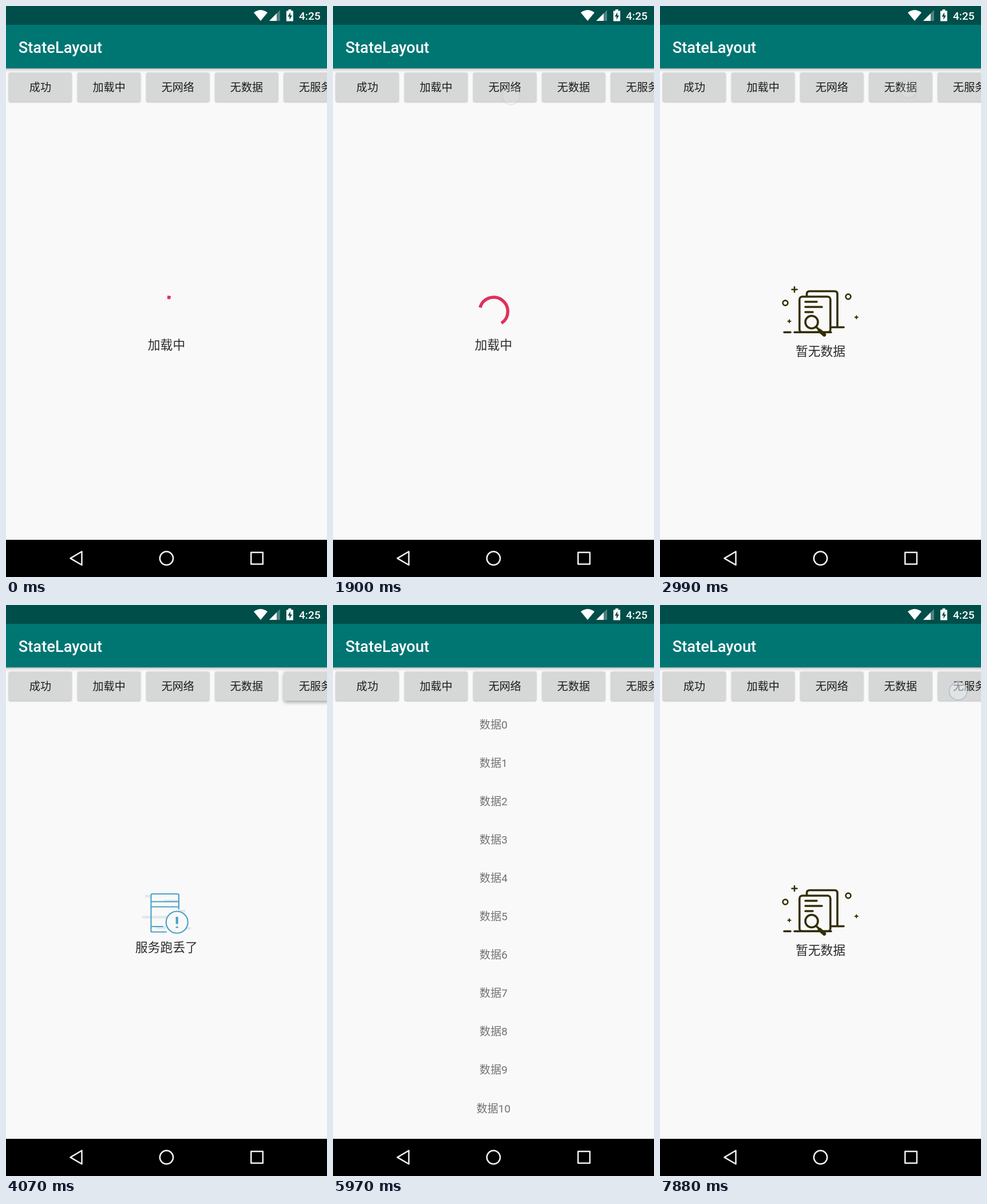
Recreate the animation shown at these times as an HTML page. Size 561x998 px, loop 8000 ms.

```html
<!DOCTYPE html>
<html lang="zh-CN">
<head>
<meta charset="utf-8">
<title>StateLayout</title>
<style>
  html, body { margin: 0; width: 100%; height: 100%; overflow: hidden; background: #f9f9f9; }
  svg { display: block; width: 100%; height: 100%; }
  text { font-family: Roboto, "Noto Sans CJK SC", "Noto Sans CJK", sans-serif; }
  .mid { text-anchor: middle; }
  .label { font-size: 19.1px; fill: #1c1c1c; }
  .item { font-size: 19.1px; fill: #727272; }
  .note { font-size: 21.8px; fill: #2c2c2c; }
  .bar { font-weight: 500; fill: #fff; }
  .button { fill: #d6d7d7; filter: drop-shadow(0 1px 1px rgba(0,0,0,.26)); }
  .button.raised { filter: drop-shadow(0 3px 3px rgba(0,0,0,.34)); }
  .line { fill: none; stroke-linecap: round; stroke-linejoin: round; }
  .state { visibility: hidden; }
  .state.on { visibility: visible; }
</style>
</head>
<body>
<svg viewBox="0 0 561 998" preserveAspectRatio="none">
  <defs>
    <linearGradient id="shade" x2="0" y2="1">
      <stop stop-color="#000" stop-opacity=".27"/>
      <stop offset=".4" stop-color="#000" stop-opacity=".09"/>
      <stop offset="1" stop-color="#000" stop-opacity="0"/>
    </linearGradient>
  </defs>
  <rect width="561" height="998" fill="#f9f9f9"/>

  <g id="buttons"></g>

  <g class="state" id="loading">
    <path id="spinner" fill="none" stroke="#e0305a" stroke-width="5.6"/>
    <text class="note mid" x="280.5" y="600.3">加载中</text>
  </g>

  <g class="state" id="offline">
    <g class="line" stroke="#4aa3c8" stroke-width="3">
      <path d="M236 526Q280 482 324 526M249 540Q280 511 311 540M262 554Q280 538 298 554"/>
      <circle cx="280" cy="568" r="4"/>
      <path d="M246 573L314 499"/>
    </g>
    <text class="note mid" x="280.5" y="611.4">网络走丢了</text>
  </g>

  <g class="state" id="empty">
    <g class="line" stroke="#332e04" stroke-width="3.6">
      <path d="M256.500 507V503.500Q256.500 498.500 261.500 498.500H305Q310 498.500 310 503.500V561M299 561.500H321"/>
      <rect x="243.800" y="508" width="54" height="62.300" rx="5"/>
      <path d="M217 570.300H228M235 570.300H299M254 517H274M254 526H283M254 535H267"/>
      <circle cx="265" cy="552.500" r="11"/>
      <path d="M273.500 561.500L279 567"/>
      <path d="M279 567.500L287 574.500" stroke-width="6.500"/>
      <g stroke-width="2.600">
        <circle cx="219" cy="519" r="4.400"/>
        <circle cx="329" cy="508" r="4.400"/>
        <path d="M230.500 495.500H239.500M235 491V500"/>
        <path d="M223.500 551H228.500M226 548.500V553.500M340.800 544H345.800M343.300 541.500V546.500" stroke-width="2"/>
      </g>
    </g>
    <text class="note mid" x="280.5" y="611.4">暂无数据</text>
  </g>

  <g class="state" id="server">
    <g fill="none" stroke="#dfe8ec" stroke-width="4.600">
      <path d="M243 509H254M276 517.500H302M300 535H313M238 545.500H284M262 564H280M314 565H323"/>
    </g>
    <g class="line" stroke="#4ba3c7" stroke-width="2.200">
      <path d="M302 531V527.500H253.500V518.500H302V527M253.500 518V507Q253.500 505 255.500 505H300Q302 505 302 507V518M253.500 527V570Q253.500 571.500 255 571.500H280M254 562H274"/>
      <circle cx="298.800" cy="554.500" r="19" fill="#f9f9f9"/>
      <path d="M298.800 545V557.500M298.800 562V564.500" stroke-width="4.200" stroke-linecap="butt"/>
    </g>
    <text class="note mid" x="280.5" y="606">服务跑丢了</text>
  </g>

  <g class="state" id="list"></g>

  <rect y="109" width="561" height="7" fill="url(#shade)"/>
  <rect y="32" width="561" height="77" fill="#007673"/>
  <rect width="561" height="33" fill="#004e49"/>
  <text class="bar" x="21.800" y="81.700" font-size="27.3">StateLayout</text>
  <text class="bar" x="512" y="23.700" font-size="19.1">4:25</text>
  <g fill="#fff">
    <path d="M433 11.500Q445 2.500 457 11.500L445 26Z"/>
    <path d="M460 26L479 7V26Z" opacity=".3"/>
    <path d="M460 26L473 13V26Z"/>
    <path d="M490 8.500H493.500V6H498.500V8.500H502V26.500H490Z"/>
  </g>
  <path d="M497 11L492.500 18.500H495.500V24L500 16.500H497Z" fill="#004e49"/>

  <rect y="933" width="561" height="65"/>
  <g fill="none" stroke="#f2f2f2" stroke-width="2.500" stroke-linejoin="round">
    <path d="M112.500 965.300L132.500 953.500V977Z"/>
    <circle cx="280.500" cy="965.300" r="11.700"/>
    <rect x="428.300" y="955" width="20.600" height="20.600"/>
  </g>

  <circle id="touch" r="15.500" fill="rgba(236,239,241,.52)" stroke="#b3c4cd" stroke-width="1.800"/>
</svg>

<script>
const LOOP = 8000, STEP = 135.8;
const $ = id => document.getElementById(id);

const states = [
  [0, 'loading'], [2040, 'offline'], [2990, 'empty'],
  [3940, 'server'], [5020, 'list'], [6920, 'empty']
];
const touches = [
  { x: 311, y: 157, button: 2, down: 1630, fade: 1900, lift: 2040, rest: 2170 },
  { x: 434, y: 145, button: 3, down: 2850, fade: 2990, lift: 3130, rest: 3260 },
  { x: 521, y: 150, button: 4, down: 3530, fade: 3940, lift: 4070, rest: 4350 },
  { x: 61, y: 153, button: 0, down: 4750, fade: 4890, lift: 5020, rest: 5160 },
  { x: 416, y: 145, button: 3, down: 6380, fade: 6790, lift: 6920, rest: 7060 },
  { x: 521, y: 150.5, button: 4, down: 7740, fade: LOOP, lift: LOOP, rest: LOOP }
];

$('buttons').innerHTML = ['成功', '加载中', '无网络', '无数据', '无服务'].map((label, i) => {
  const x = 4.7 + i * 120.2;
  return `<rect class="button" x="${x}" y="116.300" width="110.300" height="51" rx="2.700"/>
    <text class="label mid" x="${x + 55.2}" y="149.300">${label}</text>`;
}).join('');
$('list').innerHTML = Array.from({ length: 11 }, (_, i) =>
  `<text class="item mid" x="280.5" y="${216 + i * 67.05}">数据${i}</text>`).join('');
const buttons = [...document.querySelectorAll('.button')];
const panels = [...document.querySelectorAll('.state')];

// Fast-out-slow-in: cubic-bezier(.4, 0, .2, 1), solved by bisection.
function ease(x) {
  if (x <= 0) return 0;
  if (x >= 1) return 1;
  let lo = 0, hi = 1, s = .5;
  for (let i = 0; i < 20; i++) {
    s = (lo + hi) / 2;
    const at = 1.2 * s * (1 - s) ** 2 + .6 * s * s * (1 - s) + s ** 3;
    if (at < x) lo = s; else hi = s;
  }
  return 3 * s * s - 2 * s ** 3;
}

function spinnerPath(t) {
  const phase = (.865 + t / 1355) % 1;
  const turn = 28 + .123 * t + 90 * phase;
  const tail = turn + 270 * ease(phase * 2 - 1);
  const head = Math.max(tail + 4, turn + 270 * ease(phase * 2));
  const point = deg => {
    const a = deg * Math.PI / 180;
    return `${280.8 + 24.7 * Math.sin(a)} ${533.8 - 24.7 * Math.cos(a)}`;
  };
  return `M${point(tail)}A24.7 24.7 0 ${head - tail > 180 ? 1 : 0} 1 ${point(head)}`;
}

function render(t) {
  const state = states.filter(([start]) => t >= start).pop()[1];
  panels.forEach(p => p.classList.toggle('on', p.id === state));

  if (state === 'loading') $('spinner').setAttribute('d', spinnerPath(Math.floor((t + 5) / STEP) * STEP));

  const lifted = touches.find(p => t >= p.lift && t < p.rest);
  buttons.forEach((b, i) => b.classList.toggle('raised', !!lifted && lifted.button === i));

  const touch = touches.find(p => t >= p.down && t < p.lift);
  const dot = $('touch');
  dot.setAttribute('opacity', !touch ? 0 : t < touch.fade ? 1 : .3);
  if (touch) {
    dot.setAttribute('cx', touch.x);
    dot.setAttribute('cy', touch.y);
  }
}

const begin = performance.now();
function tick() {
  render((performance.now() - begin) % LOOP);
  requestAnimationFrame(tick);
}
tick();
</script>
</body>
</html>
```
